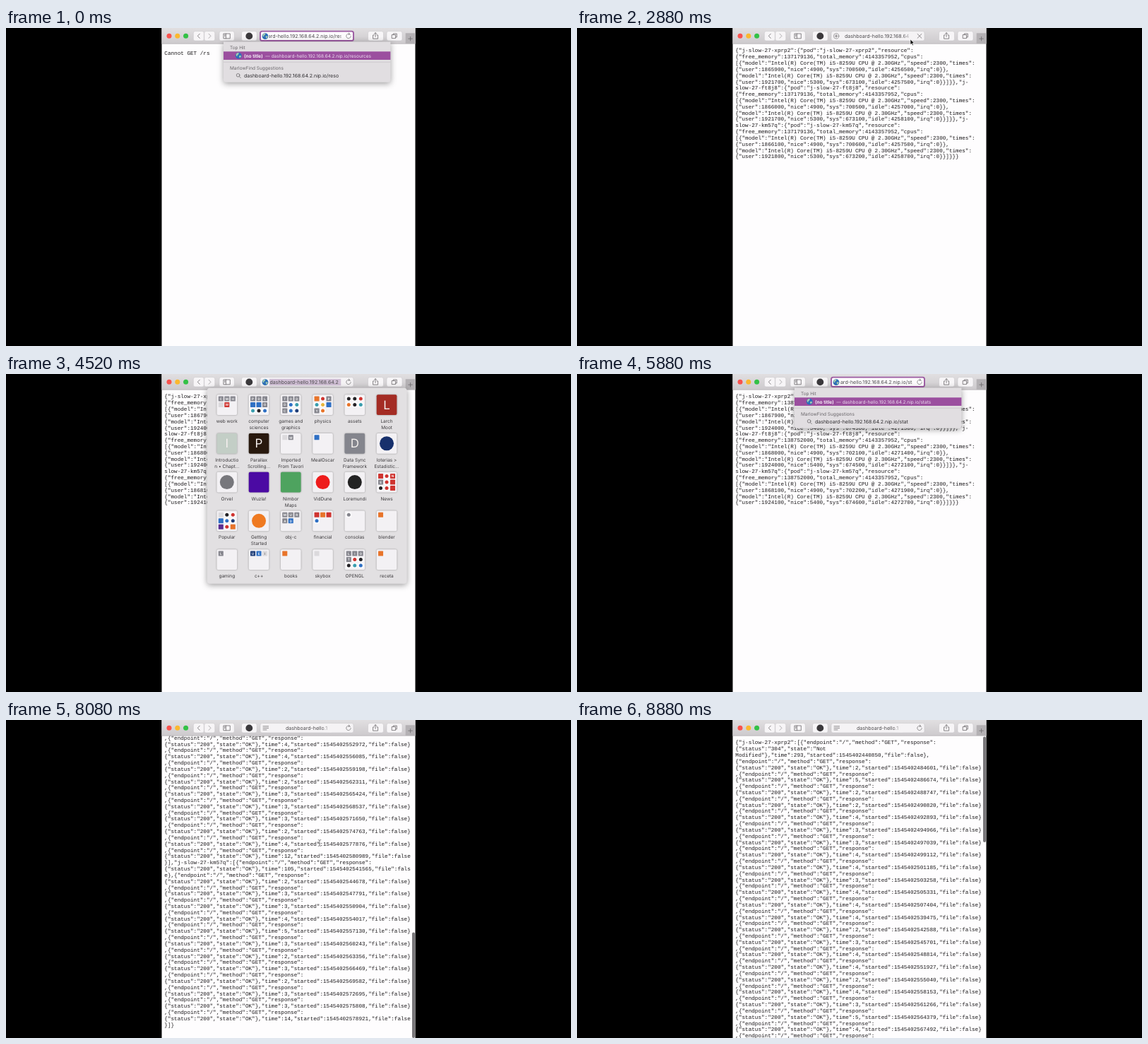
These frames come from a looping animation (800 by 450 pixels, 8920 ms). An HTML page:

```html
<!DOCTYPE html>
<html lang="en">
<head>
<meta charset="utf-8">
<title>Pod resources and stats</title>
<style>
html, body { margin: 0; width: 100%; height: 100%; overflow: hidden; background: #000; }
svg { display: block; width: 800px; height: 450px; }
text { white-space: pre; text-rendering: geometricPrecision; font-family: Inter, sans-serif; }
#page text { font: 7.65px "Liberation Mono", monospace; fill: #1c1a1c; }
.shadow { filter: drop-shadow(0 2px 4px rgba(0,0,0,.38)); }
.line { fill: none; stroke: #6b696b; stroke-width: .8; stroke-linecap: round; stroke-linejoin: round; }
</style>
</head>
<body>
<svg id="stage" viewBox="0 0 800 450" xmlns="http://www.w3.org/2000/svg"></svg>
<script>
const LOOP = 8920, STEP = 40, ROW = 8.825, COLS = 76, TOP = 34.4;
const HOST = 'dashboard-hello.192.168.64.2.nip.io/';
const PODS = ['xprp2', 'ft8j8', 'km57q'].map(id => 'j-slow-27-' + id);
const $ = id => document.getElementById(id);
const clamp = v => Math.max(0, Math.min(1, v));
const ease = v => (1 - Math.cos(Math.PI * clamp(v))) / 2;
const esc = s => s.replace(/&/g, '&amp;').replace(/</g, '&lt;').replace(/>/g, '&gt;');

const rect = (x, y, w, h, fill, r = 0, more = '') =>
  `<rect x="${x}" y="${y}" width="${w}" height="${h}" rx="${r}" fill="${fill}" ${more}/>`;
const circle = (x, y, r, fill, more = '') =>
  `<circle cx="${x}" cy="${y}" r="${r}" fill="${fill}" ${more}/>`;
const text = (x, y, size, fill, s, more = '') =>
  `<text x="${x}" y="${y}" font-size="${size}" fill="${fill}" ${more}>${esc(s)}</text>`;
const line = (d, more = '') => `<path class="line" d="${d}" ${more}/>`;

// ---- page content ----

const perPod = make => JSON.stringify(Object.fromEntries(PODS.map((pod, p) => [pod, make(pod, p)])));

// counters grow with every reload n
function resources(n) {
  const s = (n - 3) / 2, tick = v => Math.round(v / 100) * 100;
  return perPod((pod, p) => {
    const late = 100 * (p >> 1);
    const core = (user, nice, sys, idle) => ({
      model: 'Intel(R) Core(TM) i5-8259U CPU @ 2.30GHz', speed: 2300,
      times: { user: tick(user), nice: tick(nice), sys: tick(sys), idle: tick(idle), irq: 0 }
    });
    return {
      pod,
      resource: {
        free_memory: 137179136 + 1572864 * s, total_memory: 4143357952,
        cpus: [
          core(1865900 + 100 * p + 2000 * s, 4900, 700500 + late + 1600 * s, 4256500 + 500 * p + 14400 * s),
          core(1921700 + late + 2300 * s, 5300 + 100 * s, 673100 + late + 1400 * s, 4257500 + 600 * p + 14000 * s)]
      }
    };
  });
}

// evenly spaced requests: a cold first one, a quick series, then a slower series
function stats() {
  let seed = 7;
  const random = () => (seed = seed * 16807 % 2147483647) / 2147483647;
  const series = (n, from, gap) => Array.from({ length: n }, (_, i) => from + gap * i);
  return perPod((pod, p) => {
    const starts = [
      ...series(p ? 0 : 1, 440850, 0),
      ...series(p < 2 ? 12 : 0, 484601 - 987 * p, 2073),
      ...series(p < 2 ? 14 : 13, 539475 + 1045 * p, 3113)];
    return starts.map((start, i) => {
      const cached = !p && !i, last = i === starts.length - 1;
      return {
        endpoint: '/', method: 'GET',
        response: cached ? { status: '304', state: 'Not Modified' } : { status: '200', state: 'OK' },
        time: i === 0 ? 293 - 94 * p : last ? 10 + 2 * p : 2 + Math.floor(3.3 * random()),
        started: 1545402000000 + start, file: false
      };
    });
  });
}

function wrap(s) {
  const rows = [];
  let row = '';
  for (const word of s.split(/(?<=[:,])(?=[{[])|(?<=-)(?=[a-z])|(?<= )/)) {
    if (row && (row + word).trimEnd().length > COLS) { rows.push(row); row = ''; }
    row += word;
    while (row.trimEnd().length > COLS) { rows.push(row.slice(0, COLS)); row = row.slice(COLS); }
  }
  return [...rows, row];
}

const statRows = wrap(stats());
const MAX_SCROLL = TOP + (statRows.length - 1) * ROW - 433.7;
let shown = '';

function setPage(key) {
  if (key === shown) return;
  shown = key;
  const rows = key === 'none' ? ['Cannot GET /rs'] : key === 'stats' ? statRows : wrap(resources(+key));
  const y0 = key === 'none' ? 37.6 : TOP;
  $('page').innerHTML = rows.map((r, i) =>
    `<text x="224.3" y="${(y0 + i * ROW).toFixed(2)}">${esc(r)}</text>`).join('');
}

// ---- bookmarks ----

const INK = { g: '#85858d', r: '#cf3430', b: '#2f70c4', o: '#e8742a', k: '#242226', l: '#dcdadd',
  n: '#1f3d78', y: '#e7b63f', t: '#3a9dae', p: '#5a2d91' };
// '#rrggbbX' is a letter tile, '@rrggbb' a plain disc, otherwise small tiles;
// after a tile's ink comes its letter, or a dot for a disc on white
const MARKS = [
  ['web work', 'gC gM gH l rW'], ['computer|sciences', 'gP gD gL b b gO t. k. b.'],
  ['games and|graphics', 'gT gO gD gD b. t. gC b. n.'], ['physics', 'o r. gP t. y. b gY o.'],
  ['assets', 'k. k. r. o. k. t.'], ['Larch|Moot', '#a42c24L'],
  ['Introductio|n • Chapt...', '#c3cec6I'], ['Parallax|Scrolling...', '#28190eP'],
  ['Imported|From Tavori', 'l gM'], ['MealOscar', 'b'], ['Data Sync|Framework', '#84858dD'],
  ['loterias >|Estadistic...', '@17306c'],
  ['Orvel', '@77777c'], ['Wuzla!', '#4b0aa3'], ['Nimbor|Maps', '#4ea35f'], ['VidDune', '@ee1c1c'],
  ['Loremundi', '@232323'], ['News', 'r r. rN gE r. r k. r. r'],
  ['Popular', 'l k. r. b b. n. p r. o'], ['Getting|Started', '@ef7a22'], ['obj-c', 'gM gU gR gA bD'],
  ['financial', 'r o r b.'], ['consolas', 'g.'], ['blender', 'o'],
  ['gaming', 'gL'], ['c++', 'nU bE lI'], ['books', 'o'], ['skybox', 'l'],
  ['OPENGL', 'gL gI gO gT r. k. k. t. b.'], ['receta', 'o']];

function cell(x, y, [ink, sign]) {
  const dot = sign === '.';
  return rect(x - 3.5, y - 3.5, 7, 7, dot ? '#fff' : INK[ink], .7) +
    (dot ? circle(x, y, 2.5, INK[ink]) : sign ? text(x, y + 1.7, 4.6, ink === 'l' ? '#666' : '#fff', sign,
      'text-anchor="middle" font-weight="600"') : '');
}

function bookmark([label, art], i) {
  const x = 312.8 + (i % 6) * 45.25, y = 43.6 + Math.floor(i / 6) * 54.75;
  const solid = art[0] === '#';
  let s = rect(x - 14.3, y - 14.3, 28.6, 28.6, solid ? art.slice(0, 7) : '#f3f1f4', 2,
    'style="filter:drop-shadow(0 .5px .8px rgba(0,0,0,.35))"');
  if (solid) s += text(x, y + 6, 17, '#f4f0ee', art.slice(7), 'text-anchor="middle"');
  else if (art[0] === '@') s += circle(x, y, 10, '#' + art.slice(1));
  else s += art.split(' ').map((c, k) =>
    cell(x - 8.5 + (k % 3) * 8.5, y - 8.5 + Math.floor(k / 3) * 8.5, c)).join('');
  return s + label.split('|').map((l, k) =>
    text(x, y + 25.6 + k * 8.9, 6.5, '#3c3a3d', l, 'text-anchor="middle"')).join('');
}

// ---- static drawing ----

const globe = (x, y) => circle(x, y, 4.4, '#2c6fb8') +
  `<path d="M${x - 3.6} ${y - 2.2}q2-2.4 4-1.8l-.6 2.2-1.8 1 .4 1.6-1.6-.3zM${x + .4} ${y + .2}l2.8-.6.4 1.6-2 2.2z" fill="#a9cfb0"/>`;
const button = (x, w) => rect(x, 4.6, w, 13.4, '#f7f5f7', 2.6, 'stroke="#c3c0c4" stroke-width=".5"');

$('stage').innerHTML = `
<defs>
  <linearGradient id="bar" x2="0" y2="1"><stop stop-color="#e1dfe1"/><stop offset="1" stop-color="#cdcacd"/></linearGradient>
  <linearGradient id="fade"><stop stop-color="#f5f3f5" stop-opacity="0"/><stop offset="1" stop-color="#f5f3f5"/></linearGradient>
  <clipPath id="window"><rect x="220.5" width="359" height="450"/></clipPath>
  <clipPath id="field"><rect x="372.5" y="4" width="102" height="15"/></clipPath>
</defs>
${rect(0, 0, 800, 450, '#000')}
<g clip-path="url(#window)">
${rect(220, 0, 360, 450, '#fefdfe')}
<g id="page"></g>
${rect(575, 23.5, 4, 149.5, '#79777a', 2, 'id="thumb"')}
${rect(220, 0, 360, 22, 'url(#bar)')}
${rect(220, 21.8, 360, .8, '#b3b0b3')}
${['#f9524d', '#fbb82f', '#33c146'].map((c, i) => circle(231 + 11.8 * i, 11.3, 3.5, c)).join('')}
${button(265.3, 15)}${button(280.8, 15)}${button(302, 21.3)}${button(333.5, 21.7)}
${line('M274.3 8.2l-3 3.1 3 3.1')}${line('M287 8.2l3 3.1-3 3.1', 'opacity=".65"')}
${line('M308.3 8h9v6.8h-9zM311.4 8v6.8M309.3 9.8h1M309.3 11.3h1')}
${circle(344.3, 11.4, 4.9, '#3b393c')}
${button(512.5, 22)}${button(539, 22)}
<g id="share">${line('M521 10h-1.4v5.2h7V10h-1.4M523.1 12.4V6.8M521.3 8.5l1.8-1.8 1.8 1.8')}</g>
${line('M546.6 9.6h5v5h-5zM548.3 9.4V8h5v5h-1.4')}
${rect(565.7, 7.3, 14.3, 14.7, '#b4b1b4')}${line('M569.8 15.2h5.6M572.6 12.4v5.6')}
</g>
${rect(360, 4.6, 132, 13.4, '#f5f3f5', 2.6, 'id="box"')}
<g clip-path="url(#field)">
  ${rect(373, 6.9, 101.5, 9.4, '#d0bfd5', 0, 'id="sel"')}
  <text id="url" y="14" font-size="7.05" fill="#4b494c"></text>
  ${rect(460, 5, 14, 12.4, 'url(#fade)', 0, 'id="fader"')}
</g>
<g id="globe">${globe(367, 11.6)}</g>
<g id="reader">${line('M364 8.9h7.6M364 11.4h7.6M364 13.9h5')}</g>
<g id="plus">${line('M365.2 11.4h3.8M367.1 9.5v3.8')}${circle(367.1, 11.4, 3.7, 'none', 'class="line" style="stroke-width:.6"')}</g>
<g id="reload">${line('M487.6 9.6a3.2 3.2 0 1 0 .6 2M485.2 6.9l1.6 1.4-1.7 1.4', 'style="stroke-width:.7"')}</g>
<g id="stop">${line('M482.1 8.5l5.8 5.8M487.9 8.5l-5.8 5.8')}</g>
<g id="hits">
  <path class="shadow" d="M308 19.5h236.4v53.8q0 3.5-3.5 3.5H311.5q-3.5 0-3.5-3.5z" fill="#e1dee1"/>
  ${text(317, 30.3, 6.4, '#69666a', 'Top Hit')}
  ${rect(308, 33.3, 236.4, 11.7, '#9b4f9f')}
  ${globe(329.3, 39.2)}
  ${text(337, 41.6, 6.6, '#fff', '(no title)', 'font-weight="600"')}
  <text id="hit" x="367.3" y="41.6" font-size="6.5" fill="#ecdcee"></text>
  ${rect(308, 47.9, 236.4, .6, '#c3c0c4')}
  ${text(317, 59.4, 6.5, '#69666a', 'MarlowFind Suggestions')}
  ${circle(328.6, 66.8, 2.3, 'none', 'class="line"')}${line('M330.3 68.6l2 2')}
  <text id="query" x="337" y="69.9" font-size="7.02" fill="#2e2c2f"></text>
</g>
<g id="marks">
  ${rect(284.8, 19.8, 282.8, 277, '#e2e0e2', 4, 'class="shadow"')}
  ${MARKS.map(bookmark).join('')}
</g>
<path id="arrow" d="M0 0v7.6l1.8-1.6 1.2 2.8 1.3-.6-1.2-2.7h2.4z" fill="#111" stroke="#fff" stroke-width=".6"/>
<path id="beam" class="line" d="M-1.8-4.5q1.8 0 1.8 1.3 0-1.3 1.8-1.3M0-3.2v6.4M-1.8 4.5q1.8 0 1.8-1.3 0 1.3 1.8 1.3M-1 1h2"/>`;

// ---- motion ----

const show = (id, on) => $(id).setAttribute('visibility', on ? 'visible' : 'hidden');
const put = (id, s) => { if ($(id).textContent !== s) $(id).textContent = s; };

// six regular loads of the resources, then the stats and their reload
const RELOADS = 6;
const LOADS = Array.from({ length: RELOADS }, (_, i) => [360 + 612 * i, 640 + 612 * i])
  .concat([[6080, 6480], [6800, 7400]]);

function along(keys, t) {
  let i = 0;
  while (i < keys.length - 2 && t >= keys[i + 1][0]) i++;
  const [a, b] = [keys[i], keys[i + 1]], k = ease((t - a[0]) / (b[0] - a[0]));
  return [a[1] + (b[1] - a[1]) * k, a[2] + (b[2] - a[2]) * k];
}

const ARROW = [[840, 430, 90], [1000, 482, 14], [2880, 472, 16], [3880, 440, 13]];
const BEAM = [[7480, 478, 40], [7640, 444, 174]];

// typed part of the address, or null when the field is not being edited
function typed(t) {
  if (t < 360) return 'resources'.slice(0, 4 + Math.floor(t / 70));
  if (t < 4800 || t >= 6080) return null;
  if (t < 5400) return 'resources'.slice(0, 9 - Math.floor(clamp((t - 4920) / 360) * 9));
  return 'stats'.slice(0, 1 + Math.floor((t - 5400) / 150));
}

function render(t) {
  const done = LOADS.filter(l => t >= l[1]).length;
  setPage(done === 0 ? 'none' : done > RELOADS ? 'stats' : String(done - 1));

  const part = ease((t - 7600) / 460) - ease((t - 8400) / 470);
  $('page').setAttribute('transform', `translate(0 ${(-part * MAX_SCROLL).toFixed(2)})`);
  $('thumb').setAttribute('y', 23.5 + 277 * part);
  show('thumb', t >= 7640);

  const tail = typed(t), edit = tail !== null, picked = t >= 3960 && t < 4800;
  const focus = edit || picked, busy = LOADS.some(l => t >= l[0] && t < l[1]), idle = !focus && !busy;
  const box = $('box');
  box.setAttribute('fill', edit ? '#fdfbfd' : '#f5f3f5');
  box.setAttribute('stroke', edit ? '#9c5ba2' : '#c3c0c4');
  box.setAttribute('stroke-width', edit ? 1.9 : .5);
  show('sel', picked);
  show('globe', focus);
  show('plus', busy);
  show('reader', idle);
  show('stop', busy);
  show('reload', !busy);
  show('fader', !focus);
  $('share').setAttribute('opacity', t >= 7040 && t < 7360 ? .4 : 1);

  const url = $('url');
  url.setAttribute('text-anchor', edit ? 'end' : 'start');
  url.setAttribute('x', edit ? 480.6 : picked ? 373.5 : busy ? 379 : 396);
  $('fader').setAttribute('x', idle ? 447 : 460);
  put('url', edit ? HOST + tail : HOST.slice(0, idle ? 17 : picked ? 28 : 26));

  show('hits', edit && (t < 360 || t >= 5000));
  if (edit) {
    put('hit', '— ' + HOST + (tail[0] === 's' ? 'stats' : 'resources'));
    put('query', HOST + tail);
  }
  const pop = t < 4800 ? clamp((t - 4000) / 160) : 0;
  show('marks', pop > 0);
  $('marks').setAttribute('opacity', pop);

  show('arrow', t >= 840 && t < 3960);
  $('arrow').setAttribute('transform', `translate(${along(ARROW, t)})`);
  show('beam', t >= 7480 && t < 8560);
  $('beam').setAttribute('transform', `translate(${along(BEAM, t)})`);
}

const began = performance.now();
function tick() {
  const t = (performance.now() - began) % LOOP;
  render(Math.floor(t / STEP) * STEP);
  requestAnimationFrame(tick);
}
tick();
</script>
</body>
</html>
```
